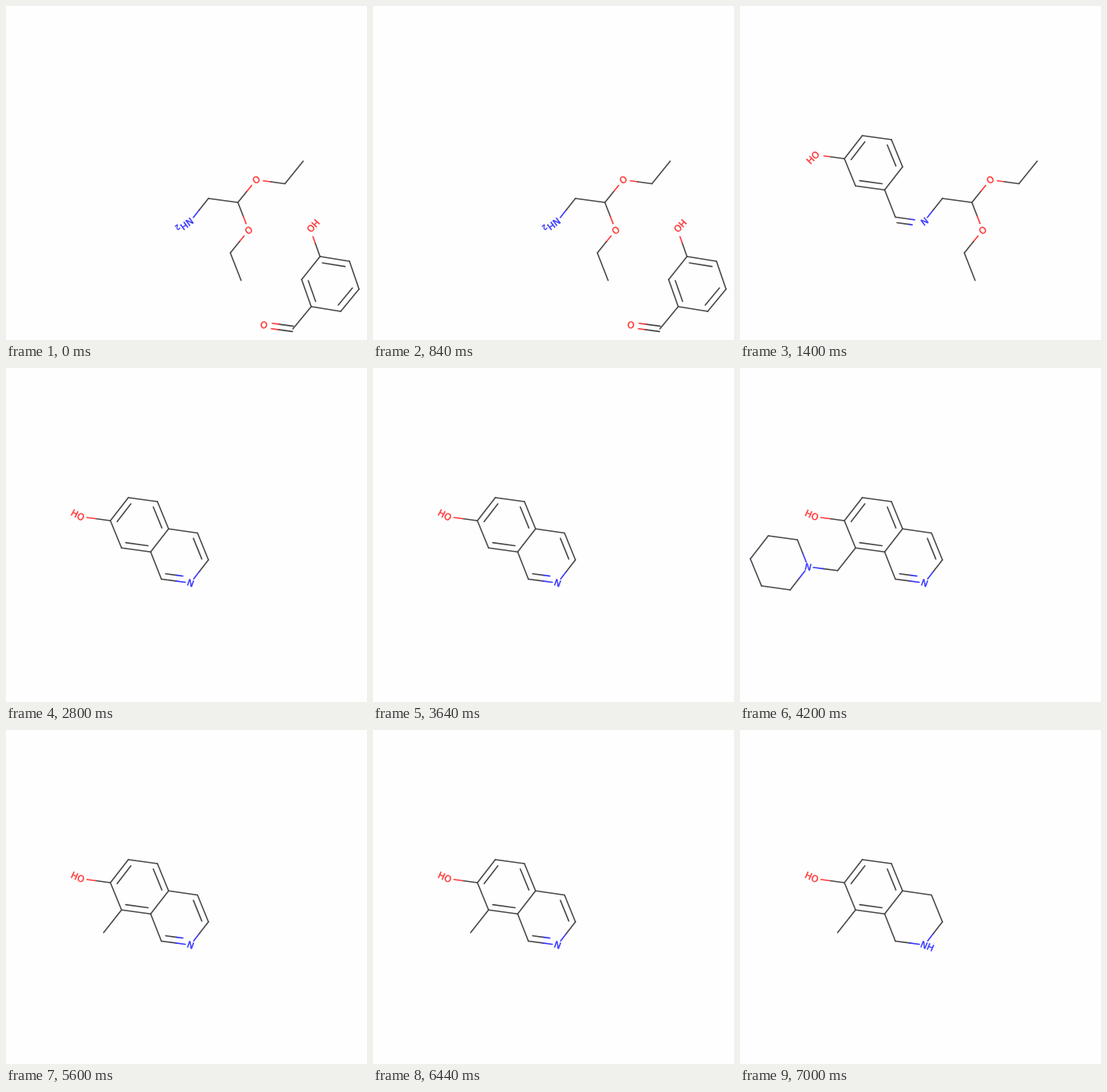
Animation of 453 by 420 pixels, one loop 8 s. Source, as an HTML page:

```html
<!DOCTYPE html>
<html lang="en">
<head>
<meta charset="utf-8">
<title>Synthesis steps</title>
<style>
  html, body { margin: 0; width: 100%; height: 100%; overflow: hidden; background: #fefefe; }
  svg { display: block; width: 453px; height: 420px; }
  line { stroke-width: 1.6; stroke-linecap: round; }
  text { font: 11.3px "DejaVu Sans", sans-serif; text-anchor: middle; stroke-width: .45; }
  .sub { font-size: 8.5px; }
</style>
</head>
<body>
<svg viewBox="0 0 453 420"></svg>
<script>
const NS = 'http://www.w3.org/2000/svg';
const svg = document.querySelector('svg');
const INK = '#484848', RED = '#ff3838', BLUE = '#3838ff';
const STEP = 1400, LOOP = 8000;

// Atom: x, y, colour, gap left free around its label
const at = (x, y, color = INK, gap = 0) => ({ x, y, color, gap });
const mix = (p, q, t) => ({ x: p.x + (q.x - p.x) * t, y: p.y + (q.y - p.y) * t });

function add(parent, tag, attrs) {
  const el = document.createElementNS(NS, tag);
  for (const k in attrs) el.setAttribute(k, attrs[k]);
  return parent.appendChild(el);
}

function line(g, p, q, stroke) {
  add(g, 'line', { x1: p.x, y1: p.y, x2: q.x, y2: q.y, stroke });
}

// Each half of a bond takes the colour of its own atom
function bond(g, a, b, p = a, q = b) {
  const len = Math.hypot(q.x - p.x, q.y - p.y);
  const start = mix(p, q, a.gap / len), end = mix(q, p, b.gap / len);
  if (a.color === b.color) return line(g, start, end, a.color);
  const mid = mix(p, q, .5);
  line(g, start, mid, a.color);
  line(g, mid, end, b.color);
}

function chain(g, ...atoms) {
  for (let i = 1; i < atoms.length; i++) bond(g, atoms[i - 1], atoms[i]);
}

// Closed ring; inner lines mark the double bonds that start at the given indices
function ring(g, atoms, doubles = [], skip = -1) {
  const c = { x: 0, y: 0 };
  for (const a of atoms) { c.x += a.x / atoms.length; c.y += a.y / atoms.length; }
  atoms.forEach((a, i) => {
    const b = atoms[(i + 1) % atoms.length];
    if (i !== skip) bond(g, a, b);
    if (doubles.includes(i)) bond(g, a, b, mix(a, c, .23), mix(b, c, .23));
  });
}

function shifted(g, a, b, dx, dy) {
  bond(g, a, b, { x: a.x + dx, y: a.y + dy }, { x: b.x + dx, y: b.y + dy });
}

function label(g, text, x, y, angle, color, sub) {
  const t = add(g, 'text', {
    transform: `translate(${x} ${y}) rotate(${angle})`, y: 4.1, fill: color, stroke: color
  });
  t.textContent = text;
  if (sub) add(t, 'tspan', { class: 'sub', dx: .8, dy: 2.5 }).textContent = sub;
}

const A = at(153.5, 163), B = at(190, 168), C = at(204, 202.3),
      D = at(181.5, 231.3), E = at(145, 226.3), F = at(131, 192),
      G = at(195, 265.5), N = at(231.5, 270.3, BLUE, 6.5),
      I = at(254, 241.3), J = at(240.3, 207.5), M = at(122.5, 254.7);
const benzene = [A, B, C, D, E, F];

function acetal(g) {
  const mid = at(291, 247), o1 = at(314, 218.5, RED, 9), o2 = at(304.5, 282, RED, 9);
  chain(g, at(231, 271, BLUE, 6.5), at(254, 242), mid, o1, at(350, 223.5), at(373, 195));
  chain(g, mid, o2, at(281.5, 310.5), at(295, 345));
  label(g, 'O', o1.x, o1.y, -40, RED);
  label(g, 'O', o2.x, o2.y, -40, RED);
}

function aldehyde(g) {
  const r = [at(394, 315), at(431, 321), at(443, 356), at(420, 384), at(383, 378), at(371, 344)];
  const ch = at(360, 406), o = at(323.5, 401, RED, 10);
  ring(g, r, [0, 2, 4]);
  chain(g, r[0], at(382, 281, RED, 9.5));
  chain(g, r[4], ch);
  shifted(g, ch, o, .5, -3.4);
  shifted(g, ch, o, -.5, 3.4);
  label(g, 'O', o.x, o.y, 10, RED);
  label(g, 'HO', 385.5, 276.5, 132, RED);
}

function phenol(g, x, y, angle, gap) {
  ring(g, benzene, [1, 3, 5]);
  chain(g, F, at(94.5, 187, RED, gap));
  label(g, 'HO', x, y, angle, RED);
}

function bicycle(g, angle) {
  phenol(g, 90, 185, angle, 7);
  ring(g, [D, G, N, I, J, C], [1, 3], 5);
  label(g, 'N', N.x, N.y, 20, BLUE);
}

const scenes = [
  g => {
    acetal(g);
    aldehyde(g);
    label(g, 'NH', 224.5, 275.8, 143, BLUE, '2');
  },
  g => {
    const n = at(231, 270.5, BLUE, 12);
    phenol(g, 91.5, 190.5, -45, 11);
    acetal(g);
    chain(g, D, G, n);
    bond(g, G, n, { x: 197, y: 272.5 }, { x: 228, y: 276.7 });
    label(g, 'N', 231.5, 271, -38, BLUE);
  },
  g => bicycle(g, 28),
  g => {
    const n = at(85.5, 250, BLUE, 6.5);
    bicycle(g, 24);
    chain(g, E, M, n);
    ring(g, [n, at(72, 216), at(35.5, 211), at(13, 240), at(27, 274), at(63, 279)]);
    label(g, 'N', n.x, n.y, 12, BLUE);
  },
  g => {
    bicycle(g, 24);
    chain(g, E, M);
  },
  g => {
    phenol(g, 90, 185, 24, 7);
    chain(g, E, M);
    ring(g, [D, G, N, I, J, C], [], 5);
    label(g, 'NH', 235, 271.8, 22, BLUE);
  }
];

const groups = scenes.map(draw => {
  const g = add(svg, 'g', {});
  draw(g);
  return g;
});

const t0 = performance.now();
function tick() {
  const t = (performance.now() - t0) % LOOP;
  const now = Math.min(Math.floor(t / STEP), groups.length - 1);
  groups.forEach((g, i) => g.setAttribute('visibility', i === now ? 'visible' : 'hidden'));
  requestAnimationFrame(tick);
}
tick();
</script>
</body>
</html>
```
